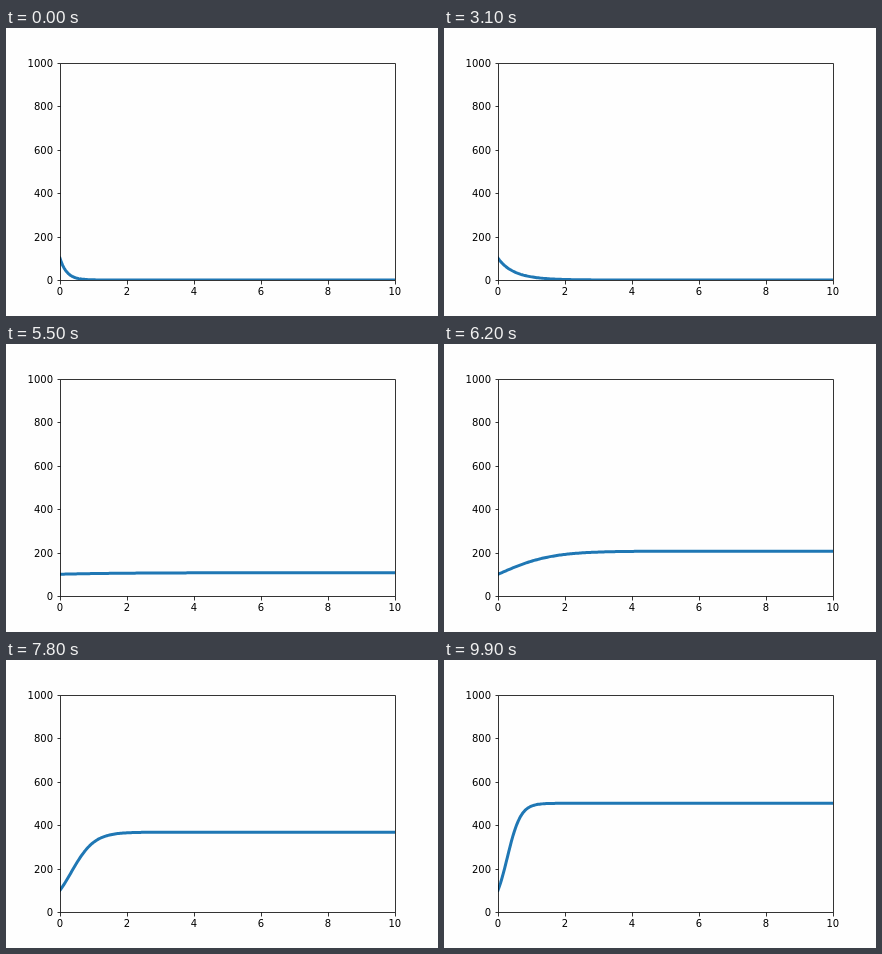
Write an HTML page that moves like this. It is 432 by 288 pixels and loops after 10 s.

```html
<!DOCTYPE html>
<html lang="en">
<head>
<meta charset="utf-8">
<title>Logistic curve</title>
<style>
  html, body { margin: 0; width: 100%; height: 100%; overflow: hidden; background: #fefefe; }
  svg { display: block; width: 432px; height: 288px; }
  text { font: 10px "DejaVu Sans", sans-serif; fill: #000; }
  .axis { fill: none; stroke: #000; stroke-width: .8; }
  .curve { fill: none; stroke: #1f77b4; stroke-width: 3; stroke-linejoin: round; stroke-linecap: square; }
</style>
</head>
<body>
<svg viewBox="0 0 432 288">
  <clipPath id="plot"><rect x="54" y="35" width="335" height="217"/></clipPath>
  <g clip-path="url(#plot)"><path class="curve" id="curve"/></g>
  <path class="axis" id="axis"/>
  <g id="labels"></g>
</svg>
<script>
  const LEFT = 54, RIGHT = 388.8, TOP = 34.56, BOTTOM = 252;
  const STEP = 100, STEPS = 100, SAMPLES = 250;
  const START = 100, SIZE = 1000, RECOVERY = 5;

  const $ = id => document.getElementById(id);
  const px = x => LEFT + (RIGHT - LEFT) * x / 10;
  const py = y => BOTTOM - (BOTTOM - TOP) * y / 1000;
  const snap = v => Math.floor(v + .5) + .5;

  function label(text, x, y, anchor) {
    const el = document.createElementNS("http://www.w3.org/2000/svg", "text");
    el.textContent = text;
    el.setAttribute("x", x);
    el.setAttribute("y", y);
    el.setAttribute("text-anchor", anchor);
    $("labels").append(el);
  }

  function drawAxes() {
    let d = "M54.5 35.5H389.5V252.5H54.5Z";
    for (let k = 0; k <= 5; k++) {
      const x = snap(px(k * 2)), y = snap(py(k * 200));
      d += `M${x} 252.5v4M54.5 ${y}h-3`;
      label(k * 2, px(k * 2), 267, "middle");
      label(k * 200, 47, y + 3.5, "end");
    }
    $("axis").setAttribute("d", d);
  }

  // Exact solution of I' = beta I (1 - I / SIZE) - RECOVERY I
  function infected(beta, t) {
    const r = beta - RECOVERY;
    const growth = r ? -Math.expm1(-r * t) / r : t;
    return 1 / (Math.exp(-r * t) / START + beta / SIZE * growth);
  }

  let shown = -1;
  function frame(now) {
    const step = Math.floor(now / STEP) % STEPS;
    if (step !== shown) {
      shown = step;
      const beta = (step + 1) / 10, points = [];
      for (let k = 0; k <= SAMPLES; k++) {
        const t = 10 * k / SAMPLES;
        points.push(px(t).toFixed(2) + " " + py(infected(beta, t)).toFixed(2));
      }
      $("curve").setAttribute("d", "M" + points.join("L"));
    }
  }

  drawAxes();
  const begin = performance.now();
  frame(0);
  requestAnimationFrame(function tick() {
    frame(performance.now() - begin);
    requestAnimationFrame(tick);
  });
</script>
</body>
</html>
```
